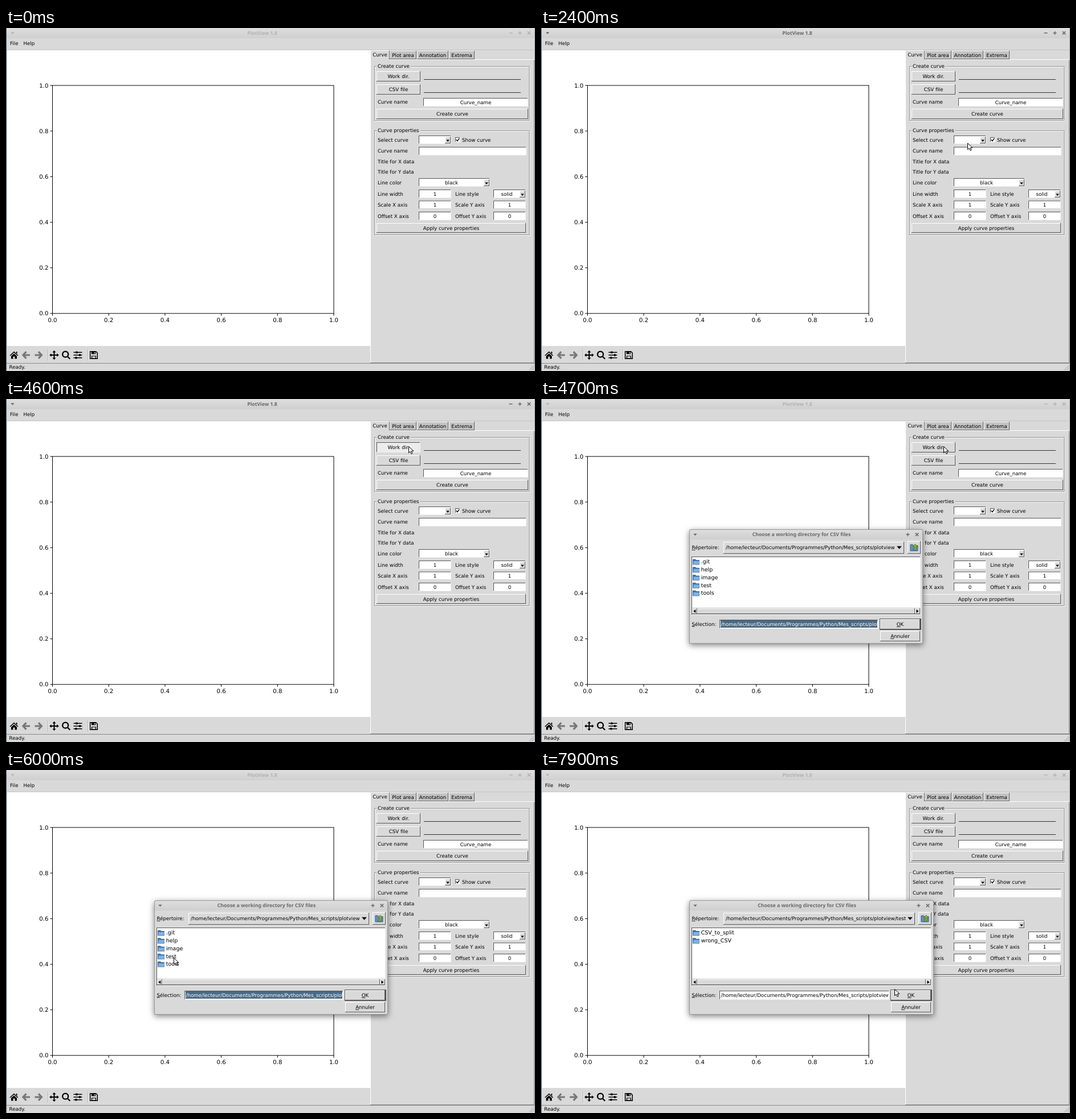
Recreate the animation shown at these times as an HTML page with a canvas. Size 928x603 px, loop 8000 ms.

```html
<!DOCTYPE html>
<html lang="en">
<head>
<meta charset="utf-8">
<title>PlotView</title>
<style>
  html, body { margin: 0; width: 100%; height: 100%; overflow: hidden; background: #d9d9d9; }
  canvas { display: block; }
</style>
</head>
<body>
<canvas id="stage" width="928" height="603"></canvas>
<script>
const LOOP = 8000;
const ctx = document.getElementById('stage').getContext('2d');
const FACE = '#d9d9d9', DARK = '#585858', LIGHT = '#fff', SELECT = '#4a6984';
const UI = '8.68px "DejaVu Sans", sans-serif';
const LIST = '9.5px "DejaVu Sans", sans-serif';
const TICK = '10.2px "DejaVu Sans", sans-serif';
const TITLE = 'bold 8.7px "Noto Sans", sans-serif';
const HOME = '/home/lecteur/Documents/Programmes/Python/Mes_scripts/plotview';

// Pointer positions, one per 100 ms from each start time; the last one is held.
const MOVES = [
  [700, [[409, 0], [428, 3], [446, 6], [460, 9], [467, 11]]],
  [2100, [[500, 33], [590, 95], [700, 172], [748, 202]]],
  [2700, [[746, 214], [745, 211]]],
  [3000, [[724, 190], [730, 174]]],
  [3400, [[732, 170], [755, 128], [740, 108], [715, 89], [706, 83]]],
  [5200, [[690, 95], [640, 140], [560, 205], [470, 270], [400, 320], [350, 348], [322, 353], [303, 341], [294, 330]]],
  [6600, [[296, 345], [301, 362], [307, 371], [313, 360], [319, 340], [323, 322], [325, 313]]],
  [7600, [[365, 320], [470, 348], [585, 377], [620, 385]]]
];

function rect(x, y, w, h, color) {
  ctx.fillStyle = color;
  ctx.fillRect(x, y, w, h);
}

// y is the middle of the capital letters
function text(s, x, y, { font = UI, color = '#000', align = 'left', underline = false } = {}) {
  ctx.font = font;
  ctx.textAlign = align;
  ctx.fillStyle = color;
  const base = y + parseFloat(font.match(/[\d.]+/)[0]) * 0.35;
  ctx.fillText(s, x, base);
  if (underline) {
    const left = align === 'center' ? x - ctx.measureText(s).width / 2 : x;
    ctx.fillRect(left, base + 1, ctx.measureText(s[0]).width, 0.8);
  }
}
const centered = (s, x, y, options) => text(s, x, y, { align: 'center', ...options });

function path(d, { x = 0, y = 0, fill, stroke, width = 1 }) {
  const shape = new Path2D(d);
  ctx.save();
  ctx.translate(x, y);
  if (fill) { ctx.fillStyle = fill; ctx.fill(shape); }
  if (stroke) { ctx.strokeStyle = stroke; ctx.lineWidth = width; ctx.stroke(shape); }
  ctx.restore();
}

function bevel(x, y, w, h, fill, topLeft, bottomRight) {
  rect(x, y, w, h, bottomRight);
  rect(x, y, w - 1, h - 1, topLeft);
  rect(x + 1, y + 1, w - 2, h - 2, fill);
}
const raised = (x, y, w, h, fill = FACE) => bevel(x, y, w, h, fill, LIGHT, DARK);
const sunken = (x, y, w, h, fill = '#fff') => bevel(x, y, w, h, fill, DARK, '#f0f0f0');

function button(label, x, y, w, h, { fill = FACE, pressed = false, underline = false } = {}) {
  (pressed ? sunken : raised)(x, y, w, h, fill);
  centered(label, x + w / 2, y + h / 2, { underline });
}

function entry(x, y, w, value = '', h = 15) {
  sunken(x, y, w, h);
  centered(value, x + w / 2, y + h / 2);
}

function combo(x, y, w, value = '') {
  sunken(x, y, w, 15);
  centered(value, x + (w - 10) / 2, y + 7.5);
  raised(x + w - 11, y + 2, 10, 12);
  path('M-2.8-1.5H2.8L0 2Z', { x: x + w - 6, y: y + 9, fill: '#000' });
}

function group(label, y, h) {
  ctx.lineWidth = 1;
  ctx.strokeStyle = LIGHT;
  ctx.strokeRect(647.5, y + 1.5, 271.5, h);
  ctx.strokeStyle = '#909090';
  ctx.strokeRect(646.5, y + 0.5, 271.5, h);
  ctx.font = UI;
  rect(650, y - 2, ctx.measureText(label).width + 4, 6, FACE);
  text(label, 652, y);
}

function titleBar(x, right, y, label, color, buttons) {
  centered(label, (x + right) / 2 - (x ? 8 : 14.5), y, { font: TITLE, color });
  path('M-3.2-1.5H3.2L0 2Z', { x: x + (x ? 10.5 : 11.5), y, fill: color });
  const marks = { minus: 'M-3 0H3', plus: 'M-3 0H3M0-3V3', close: 'M-2.7-2.7L2.7 2.7M2.7-2.7L-2.7 2.7' };
  buttons.forEach((name, i) => path(marks[name], {
    x: right - 10.5 - 16 * (buttons.length - 1 - i), y, stroke: color, width: 1.5
  }));
}

function drawPlot() {
  rect(2, 39, 637, 520, '#fff');
  ctx.strokeStyle = '#000';
  ctx.lineWidth = 1;
  ctx.strokeRect(81.5, 101, 493.5, 400.8);
  for (let i = 0; i <= 5; i++) {
    const label = (i / 5).toFixed(1), x = 81.5 + 98.7 * i, y = 501.8 - 80.16 * i;
    path('M0 0V4', { x, y: 501.8, stroke: '#000' });
    path('M0 0H-4', { x: 81.5, y, stroke: '#000' });
    centered(label, x, 513.5, { font: TICK });
    text(label, 74.5, y, { font: TICK, align: 'right' });
  }
}

function drawToolbar() {
  const y = 575, black = '#000', gray = '#777';
  path('M-7.5 .5L0-6.5L7.5 .5L6.5 1.6L0-4.4L-6.5 1.6Z M3.6-6H5.6V-2L3.6-4Z M-5 1.8L0-2.8L5 1.8V6.5H1.5V2.5H-1.5V6.5H-5Z', { x: 14, y, fill: black });
  path('M0-5.8L-5.5 0L0 5.8M-5 0H6.5', { x: 35.5, y, stroke: gray, width: 3.2 });
  path('M0-5.8L5.5 0L0 5.8M5 0H-6.5', { x: 57, y, stroke: gray, width: 3.2 });
  for (const x of [73, 143]) {
    rect(x, 565, 1, 20, '#b5b5b5');
    rect(x + 1, 565, 1, 20, '#f0f0f0');
  }
  path('M-6 0H6M0-6V6', { x: 84.5, y, stroke: black, width: 2 });
  path('M0-8.3L3-4.8H-3Z M0 8.3L3 4.8H-3Z M-8.3 0L-4.8-3V3Z M8.3 0L4.8-3V3Z', { x: 84.5, y, fill: black });
  path('M3.7-1.3A5 5 0 1 1-6.3-1.3A5 5 0 1 1 3.7-1.3 M2.2 2.2L6.8 6.8', { x: 105.5, y, stroke: black, width: 2.3 });
  path('M-7.5-4.7H7.5M-7.5 0H7.5M-7.5 4.7H7.5', { x: 126, y, stroke: black, width: 1.5 });
  path('M-3.5-6.5h3v3.6h-3Z M2-1.8h3v3.6h-3Z M-4.5 2.9h3v3.6h-3Z', { x: 126, y, fill: black });
  path('M-6.3-6.3H3.8L6.3-3.8V6.3H-6.3Z', { x: 154, y, stroke: black, width: 1.5 });
  path('M-4-6H3.3V-1.8H-4Z M-4 1.2H4V6H-4Z', { x: 154, y, fill: black });
  path('M.6-5h1.6v2.3h-1.6Z M-2.8 2.3h5.6v3h-5.6Z', { x: 154, y, fill: FACE });
}

function drawPanel(hovered, pressed) {
  // notebook
  rect(639, 55, 288, 1, LIGHT);
  rect(639, 40, 1, 549, LIGHT);
  rect(926, 56, 1, 533, '#8a8a8a');
  rect(639, 588, 288, 1, '#8a8a8a');
  [['Plot area', 673, 47], ['Annotation', 721, 55], ['Extrema', 777, 45]].forEach(([label, x, w]) => {
    bevel(x, 40, w, 15, '#c3c3c3', '#eee', '#666');
    centered(label, x + w / 2, 48);
  });
  rect(640, 39, 33, 17, FACE);
  rect(640, 39, 32, 1, LIGHT);
  rect(672, 40, 1, 15, '#666');
  centered('Curve', 656, 47);

  group('Create curve', 67, 95);
  button('Work dir.', 650, 76, 77, 18, { fill: hovered ? '#ececec' : FACE, pressed });
  button('CSV file', 650, 99, 77, 18);
  rect(733, 90, 170, 1, '#333');
  rect(733, 113, 170, 1, '#333');
  text('Curve name', 652, 130);
  entry(732, 123, 184, 'Curve_name');
  button('Create curve', 650, 142, 266, 18);

  group('Curve properties', 180, 183);
  text('Select curve', 652, 196.5);
  combo(724, 189, 57);
  sunken(788, 192, 9, 9);
  path('M789.8 196.2L791.8 198.6L795.4 193.8', { stroke: '#000', width: 1.4 });
  text('Show curve', 800, 196.5);
  text('Curve name', 652, 216);
  entry(724, 209, 189);
  text('Title for X data', 652, 235);
  text('Title for Y data', 652, 253);
  text('Line color', 652, 272);
  combo(724, 264, 125, 'black');
  text('Line width', 652, 291.5);
  entry(724, 284, 57, '1');
  text('Line style', 788, 291.5);
  combo(855, 284, 57, 'solid');
  [['Scale', '1', 303.5], ['Offset', '0', 323]].forEach(([label, value, y]) => {
    text(label + ' X axis', 652, y + 7.5);
    entry(724, y, 57, value);
    text(label + ' Y axis', 788, y + 7.5);
    entry(855, y, 57, value);
  });
  button('Apply curve properties', 650, 343, 262, 17);
}

function drawWindow(active, hovered, pressed) {
  rect(0, 0, 928, 603, FACE);
  const bar = ctx.createLinearGradient(0, 0, 0, 18);
  bar.addColorStop(0, '#dedede');
  bar.addColorStop(1, '#cfcfcf');
  rect(0, 0, 928, 18, bar);
  titleBar(0, 928, 8.7, 'PlotView 1.8', active ? '#686868' : '#b2b2b2', ['minus', 'plus', 'close']);
  text('File', 7, 27);
  text('Help', 30.5, 27);
  rect(1, 38, 926, 1, '#c4c4c4');
  drawPlot();
  drawToolbar();
  drawPanel(hovered, pressed);
  rect(1, 589, 926, 1, '#8a8a8a');
  text('Ready.', 5.5, 596.2);
  for (const d of [3, 6, 9]) {
    path(`M${927 - d} 601.5L927 ${601.5 - d}`, { stroke: '#888' });
    path(`M${928 - d} 601.5L928 ${601.5 - d}`, { stroke: '#fff', width: 0.6 });
  }
  rect(0, 0, 1, 603, '#3c5478');
  rect(927, 0, 1, 603, '#a4a4a4');
}

function folder(x, y) {
  path('M.5 1H5L6 2.5H11.5V10H.5Z', { x, y, fill: '#3f74ad', stroke: '#2f5a8c', width: 0.8 });
  path('M1.6 4H12L11.3 9.8H1Z', { x, y, fill: '#7db2e4' });
}

function drawDialog(right, location, items, { selected, entryText, entrySelected }) {
  const left = 260, top = 229, w = right - left, h = 201;
  ctx.save();
  ctx.shadowColor = 'rgba(0,0,0,.5)';
  ctx.shadowBlur = 11;
  ctx.shadowOffsetY = 3;
  ctx.fillStyle = '#9a9a9a';
  ctx.beginPath();
  ctx.roundRect(left, top, w, h, [4, 4, 0, 0]);
  ctx.fill();
  ctx.restore();
  const bar = ctx.createLinearGradient(0, top, 0, 247);
  bar.addColorStop(0, '#dedede');
  bar.addColorStop(1, '#cfcfcf');
  ctx.fillStyle = bar;
  ctx.beginPath();
  ctx.roundRect(left + 1, top + 1, w - 2, 18, [3, 3, 0, 0]);
  ctx.fill();
  rect(left + 1, 247, w - 2, 182, FACE);
  titleBar(left, right, 238.3, 'Choose a working directory for CSV files', '#686868', ['plus', 'close']);

  text('Répertoire:', 264.5, 261, { underline: true });
  raised(320, 251, right - 353, 21);
  text(location, 324, 261);
  path('M-4.3-2.3H4.3L0 2.7Z', { x: right - 41.5, y: 261, fill: '#000' });
  raised(right - 27, 250, 23, 22);
  path('M-6.5-5H-2L-1-3.3H6.5V6H-6.5Z', { x: right - 15.5, y: 261, fill: '#5c93c8', stroke: '#345c86' });
  path('M2-6L6.3-1.2H3.7V4.5H-2V2.2H.6V-1.2H-2.3Z', { x: right - 15.5, y: 261, fill: '#8fae3e', stroke: '#4f6a26', width: 0.8 });

  sunken(264, 277, right - 268, 103);
  items.forEach((name, i) => {
    const y = 286 + 13.75 * i, chosen = name === selected;
    folder(266, y - 5);
    if (chosen) {
      ctx.font = LIST;
      rect(280, y - 6.3, ctx.measureText(name).width + 2, 13, SELECT);
    }
    text(name, 280.7, y, { font: LIST, color: chosen ? '#fff' : '#000' });
  });
  rect(265, 367, right - 270, 12, '#c3c3c3');
  raised(265, 368, 9, 10);
  raised(right - 14, 368, 9, 10);
  raised(274, 368, right - 288, 10);
  path('M2-3V3L-2 0Z', { x: 269.3, y: 373, fill: '#000' });
  path('M-2-3V3L2 0Z', { x: right - 9.5, y: 373, fill: '#000' });

  text('Sélection:', 264.5, 395.5, { underline: true });
  sunken(313, 388, right - 391, 16);
  if (entrySelected) rect(315, 389, right - 395, 13, SELECT);
  ctx.save();
  ctx.beginPath();
  ctx.rect(315, 389, right - 395, 14);
  ctx.clip();
  text(entryText, 315.5, 395.5, { color: entrySelected ? '#fff' : '#000' });
  ctx.restore();
  rect(right - 76, 386, 73, 20, '#555');
  button('OK', right - 75, 387, 70, 18, { underline: true });
  button('Annuler', right - 75, 408, 70, 18, { underline: true });
}

function drawPointer(t) {
  const move = MOVES.findLast(([start]) => t >= start);
  if (!move) return;
  const [start, points] = move;
  const [x, y] = points[Math.min(Math.floor((t - start) / 100), points.length - 1)];
  if (t >= 2700 && t < 3000) {
    path('M-2.5-6.5H2.5M0-6.5V6.5M-2.5 6.5H2.5', { x, y, stroke: '#000' });
  } else {
    path('M.5 .5V11.8L3.2 9.3L5.1 13.5L7 12.6L5.2 8.6H9Z', { x, y, fill: '#fff', stroke: '#000' });
  }
}

function draw(t) {
  ctx.textRendering = 'geometricPrecision';
  drawWindow(t >= 1300 && t < 4700, t >= 3700 && t < 4700, t >= 4600 && t < 4700);
  if (t >= 4700) {
    const clicked = t >= 6100, opened = t >= 6300;
    drawDialog(
      t >= 6400 ? 689 : 670,
      opened ? HOME + '/test' : HOME,
      opened ? ['CSV_to_split', 'wrong_CSV'] : ['.git', 'help', 'image', 'test', 'tools'],
      { selected: clicked ? 'test' : '', entryText: clicked ? HOME + '/test' : HOME, entrySelected: !clicked }
    );
  }
  drawPointer(t);
}

const begin = performance.now();
function tick() {
  draw((performance.now() - begin) % LOOP);
  requestAnimationFrame(tick);
}
tick();
</script>
</body>
</html>
```
